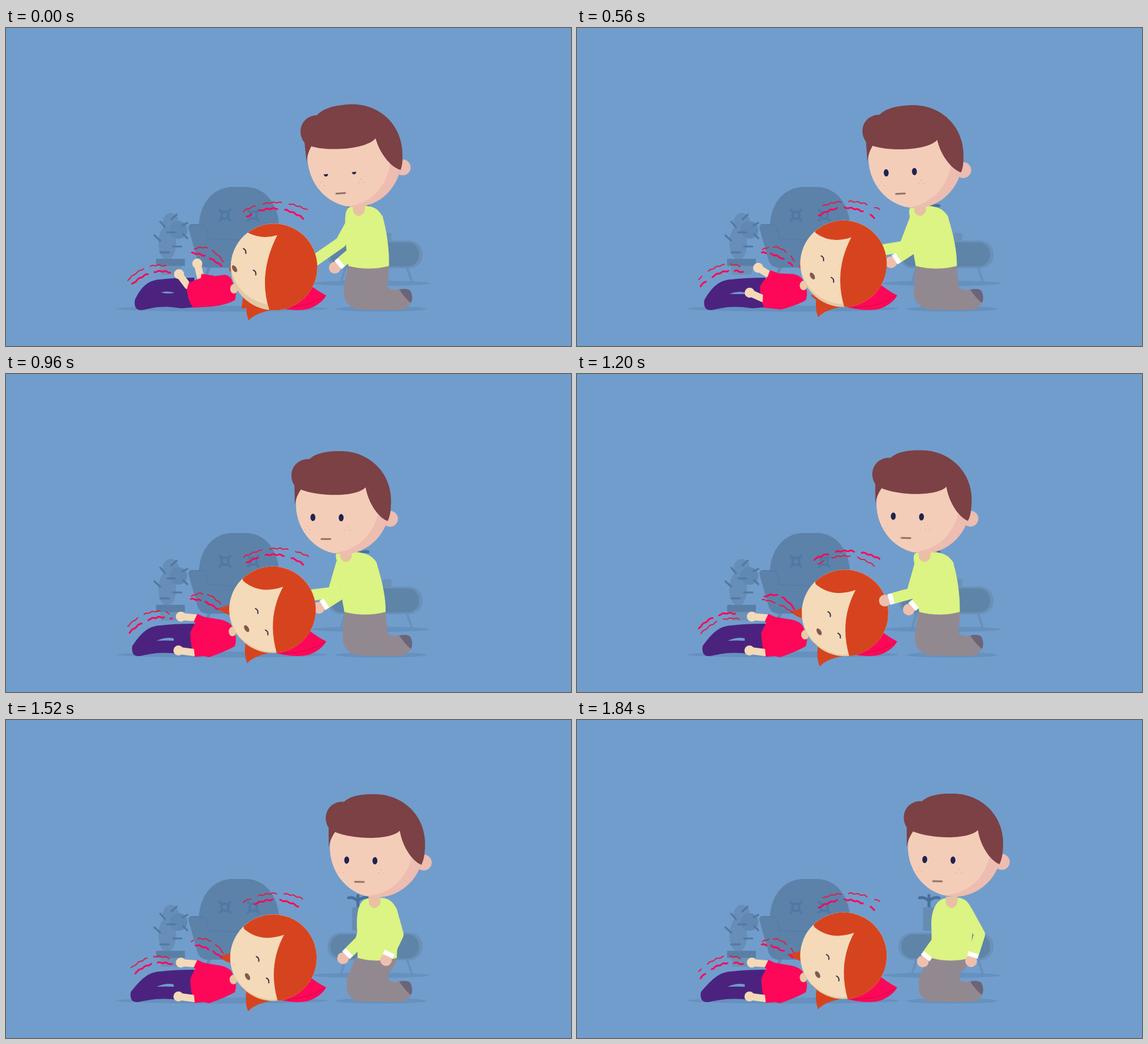
Write an HTML page with a canvas that moves like this. It is 960 px wide and 540 px high and loops after 1920 ms.

```html
<!DOCTYPE html>
<html lang="en">
<head>
<meta charset="utf-8">
<title>First aid</title>
<style>
html, body { margin: 0; width: 100%; height: 100%; overflow: hidden; background: #719dcc; }
canvas { display: block; width: 960px; height: 540px; }
</style>
</head>
<body>
<canvas id="stage" width="960" height="540"></canvas>
<script>
const ctx = document.getElementById('stage').getContext('2d');
const STEP = 80, FRAMES = 24;

const C = {
  bg: '#719dcc', shadow: '#6691be', chair: '#5c82aa', chairDark: '#4e79a4',
  cactus: '#678eb8', spike: '#53789f', pot: '#5a7fa6', rim: '#6b91b8',
  skin: '#f4cdb8', skinShade: '#ecbdb0', hand: '#efbfae', hair: '#7b4145',
  sweater: '#dbf483', trousers: '#928990', sock: '#6c6478', eye: '#1f2450',
  girlSkin: '#f4dab8', girlShade: '#e4c8a4', girlHair: '#d6441f',
  red: '#fd0858', redDark: '#dc0650', purple: '#4b237f'
};

const mix = (a, b, k) => a + (b - a) * k;
const mixPt = (a, b, k) => [mix(a[0], b[0], k), mix(a[1], b[1], k)];
// Eased progress from 0 to 1 between two times
const ease = (t, from, to) => {
  const u = Math.min(1, Math.max(0, (t - from) / (to - from)));
  return u * u * (3 - 2 * u);
};

function shape(color, d) {
  ctx.fillStyle = color;
  ctx.fill(new Path2D(d));
}
function stroke(color, width, d, cap = 'round') {
  ctx.strokeStyle = color;
  ctx.lineWidth = width;
  ctx.lineCap = cap;
  ctx.lineJoin = 'round';
  ctx.stroke(new Path2D(d));
}
function oval(color, x, y, rx, ry = rx, rot = 0) {
  ctx.fillStyle = color;
  ctx.beginPath();
  ctx.ellipse(x, y, rx, ry, rot, 0, 7);
  ctx.fill();
}
function box(color, x, y, w, h, r) {
  ctx.fillStyle = color;
  ctx.beginPath();
  ctx.roundRect(x, y, w, h, r);
  ctx.fill();
}
function clipOval(x, y, rx, ry) {
  ctx.beginPath();
  ctx.ellipse(x, y, rx, ry, 0, 0, 7);
  ctx.clip();
}

function drawRoom() {
  ctx.fillStyle = C.bg;
  ctx.fillRect(0, 0, 960, 540);
  oval(C.shadow, 620, 433.5, 100, 4.5);
  oval(C.shadow, 367, 476.5, 180, 5);
  oval(C.shadow, 637, 477, 77, 4.5);

  // armchair
  stroke('#6389b2', 5, 'M346 405L340 421');
  shape(C.chair, 'M328 345C325 300 352 270 384 270L408 270C440 270 466 300 464 345L464 407L340 407Q328 405 325 393L310 340Q309 333 316 333L330 333Z');
  stroke('#557ca6', 1.5, 'M314 334L335 334Q342 340 344 358L396 360');
  for (const x of [372, 420]) {
    stroke(C.chairDark, 4, `M${x - 9} 309L${x + 9} 327M${x + 9} 309L${x - 9} 327`);
    oval(C.chairDark, x, 318, 8);
    oval(C.chair, x, 318, 4);
  }

  // cactus
  oval(C.cactus, 274, 365, 15, 29);
  oval(C.cactus, 280, 331, 14, 17);
  oval('#6088b3', 293, 343, 15);
  stroke(C.spike, 3.2, 'M262 329L270 338M281 325L290 317M274 347L287 347M252 352L262 361M284 371L298 371M262 381L277 381M300 335L308 331M301 350L308 357');
  shape(C.rim, 'M261 402L299 402L296 419L264 419Z');
  box(C.pot, 255, 392, 49, 12, 1);

  // side table with a plant
  stroke('#6990bb', 4, 'M577 406L569 432M681 406L690 432');
  box(C.rim, 546, 361, 162, 47, 23);
  box('#5e84a7', 551, 364, 151, 41, 20);
  stroke('#49709b', 5, 'M598 318L598 298M598 307Q590 300 582 302M598 307Q606 300 615 302');
  box('#678cb4', 588, 318, 24, 40, 3);
  box(C.rim, 640, 348, 15, 13, 3);
}

// The man leans in, holds her head, then sits back
function manPose(t) {
  const approach = 1 - Math.max(0, 1 - t / 960) ** 3;
  const release = ease(t, 960, 1720);
  const via = (start, hold, rest) => mixPt(mixPt(start, hold, approach), rest, release);
  const lean = mix(mix(.75, 1, approach), 0, release);
  const tilt = mix(-4.5, 1.4, ease(t, 150, 1200));
  const headX = 639 - 70 * lean - tilt * .35;
  return {
    lean, tilt, headX, headY: 211 + 6 * lean, neck: headX + 10 * lean - tilt,
    lid: mix(2.2, -7, ease(t, 240, 420)),
    back: 671 - 41 * lean, chest: 602 - 34 * lean,
    hipL: 602 - 27 * lean, hipR: 668 - 23 * lean, knee: 580 - 8 * lean,
    elbowA: via([569, 364], [556, 371], [612, 376]),
    wristA: via([520, 398], [515, 376], [594, 401]),
    elbowB: via([600, 372], [580, 366], [684, 364]),
    wristB: via([567, 400], [541, 391], [673, 399])
  };
}

function drawArm(sx, sy, [ex, ey], [wx, wy]) {
  const len = Math.hypot(wx - ex, wy - ey), dx = (wx - ex) / len, dy = (wy - ey) / len;
  oval(C.hand, wx + dx * 11, wy + dy * 11, 10);
  stroke(C.sweater, 19, `M${sx} ${sy}L${ex} ${ey}L${wx - dx * 6} ${wy - dy * 6}`);
  stroke('#fff', 18.5, `M${wx - dx * 4} ${wy - dy * 4}L${wx + dx * 4} ${wy + dy * 4}`, 'butt');
}

function drawManHead(p) {
  ctx.save();
  ctx.translate(p.headX, p.headY);
  ctx.rotate(p.tilt * Math.PI / 180);
  oval(C.skinShade, 84, 28, 13.5);
  ctx.save();
  clipOval(4, 4, 80, 85);
  oval(C.skinShade, 4, 4, 82, 86);
  oval(C.skin, -16, 2, 81, 85);
  ctx.restore();
  shape(C.hair, 'M-78 6L-79 -27C-92 -47 -80 -73 -54 -72C-41 -84 -20 -86 0 -86C50 -86 92 -46 85 12Q84 24 80 32C62 25 46 -2 42 -25C26 -8 -36 -8 -68 -20Q-76 -8 -78 6Z');
  for (const x of [-47, 1]) {
    ctx.save();
    ctx.beginPath();
    ctx.rect(x - 6, 27 + p.lid, 12, 14);
    ctx.clip();
    oval(C.eye, x, 27, 4.2, 6.2);
    ctx.restore();
  }
  for (const x of [-56, 12])
    for (const [dx, dy] of [[0, 0], [-4, 6], [4, 6]]) oval('#e8b3a2', x + dx, 42 + dy, 1.1);
  stroke('#957267', 3, 'M-32 63.5L-17 63.5');
  ctx.restore();
}

function drawMan(p) {
  shape(C.trousers, `M${p.hipL} 400Q${p.knee + 1} 430 ${p.knee} 448C${p.knee} 470 590 480 610 478L640 479L666 479C690 478 694 460 684 445L667 444C653 447 644 440 ${mix(649, p.hipR, .2)} 428Q${p.hipR} 416 ${p.hipR} 400Z`);
  shape(C.sock, 'M668 444Q681 441 687 446Q693 458 688 467Q678 459 668 444Z');
  const slit = 614 - 8 * p.lean;
  stroke('#7d8eaa', 2, `M${slit} ${mix(445, 433, p.lean)}L${slit} 445`);

  const n = p.neck;
  drawArm(n - 8, 322, p.elbowA, p.wristA);
  shape(C.sweater, `M${n - 12} 303C${n - 26} 305 ${p.chest} 322 ${p.chest} 348Q${p.chest + 1} 374 ${p.hipL} 404Q${(p.hipL + p.hipR) / 2} 413 ${p.hipR} 404C${p.hipR + 1} 376 ${p.back + 6} 342 ${p.back} 322Q${p.back - 8} 303 ${n + 12} 302Z`);
  drawArm(p.back - 9, 324, p.elbowB, p.wristB);
  shape('#e9c0a5', `M${n - 11} 300L${n + 10} 300L${n + 9} 312Q${n} 326 ${n - 10} 313Z`);
  drawManHead(p);
}

// k: 0 on her side, 1 rolled onto her back
function drawGirlBody(k, t) {
  const foot = mix(226, 217.5, t / 1840);
  shape(C.purple, `M320 424Q285 424 262 427C240 428 228 442 ${foot - 7} 462C${foot - 9} 474 ${foot - 4} 480 ${foot + 5} 479C${foot + 22} 476 260 470 298 476L322 474Z`);
  const gap = mix(263, 256, k), gapY = mix(449, 453, k);
  shape(C.bg, `M${gap} ${gapY}Q272 446 285 449L285 ${mix(450, 453, k)}Q272 452 ${gap} ${gapY}Z`);

  const limb = (shoulder, base, hand) => {
    stroke(C.girlSkin, 12, `M${base}L${hand}`);
    oval(C.girlSkin, ...hand, 8.5);
    stroke(C.red, 15, `M${shoulder}L${base}`, 'butt');
  };
  limb([352, 428], mixPt([331, 425], [322, 414], k), mixPt([325, 400], [297, 412], k));
  const left = mix(307, 313, k);
  shape(C.red, `M${left} 440Q${left + 4} 430 ${mix(334, 328, k)} ${mix(424, 411, k)}L${mix(372, 364, k)} ${mix(419, 417, k)}Q383 421 385 432Q394 446 389 462Q376 470 ${mix(350, 345, k)} ${mix(473, 481, k)}L318 475Q${left + 1} 462 ${left} 440Z`);
  limb(mixPt([335, 446], [350, 470], k), mixPt([309, 438], [320, 473], k), mixPt([294, 418], [293, 469.5], k));
}

function drawGirlHead(k, i) {
  shape(C.red, 'M448 471Q488 483 514 477Q536 469 544 454Q530 447 516 436L470 440Z');
  stroke(C.redDark, 1.5, 'M470 474Q515 474 541 455');
  const jolt = Math.cos(i * 2 * Math.PI / 5);
  ctx.save();
  ctx.translate(454 + 1.4 * jolt, 402.8 + 3 * jolt);
  // side pigtail slides out while the back lock slides in
  const tip = mix(-70, -92, Math.max(0, (k - .62) / .38));
  shape(C.girlHair, `M-68 -10Q-80 -5 ${tip} -3Q-84 8 -66 10Z`);
  shape(C.girlHair, `M-53 52L-55 ${mix(70, 45, k)}Q-48 ${mix(72, 56, k)} -38 64Z`);
  shape(C.girlHair, 'M-46 56Q-49 78 -43 91Q-32 77 8 71L0 58Z');
  oval('#ebc9a6', -68, 37, 6.5, 8);

  ctx.save();
  clipOval(0, 0, 73.5, 73.5);
  oval(C.girlShade, 0, 0, 75);
  oval(C.girlSkin, 0, mix(-10, -3, k), 74);
  const start = mixPt([-44, -58], [-50, -49], k), point = mixPt([5.5, -54], [18, -39], k);
  const low = mixPt([-8, 73], [7, 73], k), bulge = mixPt([-28, 12], [-10, 13], k);
  shape(C.girlHair, `M${start}Q${mixPt([-20, -46], [-22, -25], k)} ${point}Q${bulge} ${low}L90 90L90 -90L-60 -90Z`);
  ctx.restore();

  ctx.translate(...mixPt([-67, 3], [-44, 32], k));
  oval('#82594d', 0, 0, 3.5, 6.4, -.55);
  for (const [x, y] of [[18, -30], [35, 6.5]])
    stroke('#38344d', 2, `M${x - 3} ${y - 4}Q${x + 2} ${y - 2} ${x + 1} ${y + 4}`);
  ctx.restore();
}

// Dashes that slide along an arc from x0 to x1
function tremor([x0, y0, cy, x1, y1], start, period, dash, dy, bold) {
  const yAt = x => {
    const u = (x - x0) / (x1 - x0), w = 1 - u;
    return y0 * w * w + 2 * cy * u * w + y1 * u * u + dy + Math.sin(x * .55);
  };
  let a = start;
  while (a > x0 - dash) a -= period;
  for (; a < x1; a += period) {
    const from = Math.max(a, x0), to = Math.min(a + dash, x1);
    if (to - from < 2) continue;
    let d = `M${from} ${yAt(from)}`;
    for (let x = from + 3; x < to; x += 3) d += `L${x} ${yAt(x)}`;
    stroke(bold ? C.red : '#dc2148', bold ? 3 : 2, d + `L${to} ${yAt(to)}`);
  }
}

function drawTremors(i) {
  const shake = 4 * Math.sin(i * Math.PI / 6), high = shake > 1;
  const pair = (outer, inner, start, gap, period, dash, amp) => {
    tremor(outer, start, period, dash, shake * amp, high);
    tremor(inner, start + gap, period, dash, shake * amp * .6, !high);
  };
  pair([403, 311, 282, 514, 310], [409, 321, 291, 505, 323], 437 - 2.75 * i, -7, 44, 31, 1);
  pair([315, 378, 361, 369, 396], [314, 382, 383, 366, 404], 320 + 1.9 * i, -4, 30, 22, .6);
  pair([207, 428, 394, 277, 406], [210, 439, 404, 282, 416], 207 + 2.3 * i, 7, 38, 27, .8);
}

function render(now) {
  const i = Math.floor(now / STEP) % FRAMES, t = i * STEP;
  const man = manPose(t), turn = ease(t, 100, 900);
  const handInFront = t > 1100;
  drawRoom();
  if (!handInFront) drawMan(man);
  drawGirlBody(turn, t);
  drawGirlHead(turn, i);
  if (handInFront) drawMan(man);
  drawTremors(i);
}

const begin = performance.now();
function loop() {
  render(performance.now() - begin);
  requestAnimationFrame(loop);
}
loop();
</script>
</body>
</html>
```
